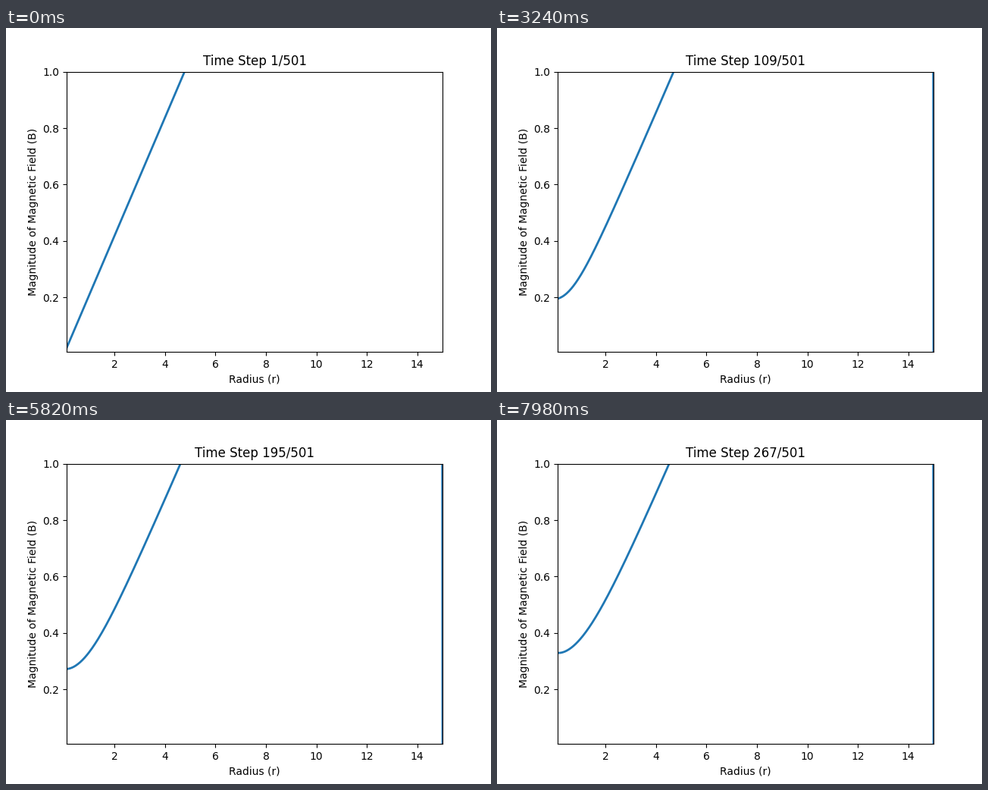
A matplotlib script that plays this animation: 640 px wide and 480 px high, repeating every 8 s.

```python
import numpy as np
import matplotlib.pyplot as plt
from matplotlib.animation import FuncAnimation

LOOP_MS = 8000
FRAMES = 267
TOTAL_STEPS = 501

R_MIN, R_MAX = 0.1, 15.0
SLOPE = np.pi / 15        # initial field is linear in r
DIFF = 0.0025             # diffusion per time step
LIFT = 3.05e-7            # slow overall growth
EDGE_WIDTH = 0.25         # reach of the inner boundary layer

r = np.linspace(R_MIN, R_MAX, 500)
theta = (np.arange(200) + 0.5) * np.pi / 200
cos_t = np.cos(theta)


def diffused_radius(spread):
    """Linear cone |r| smoothed by a 2D Gaussian, with spread = D * t."""
    x = r**2 / (4 * spread)
    weight = np.exp(np.outer(x / 2, cos_t - 1))
    i0 = weight.mean(axis=1)
    i1 = (weight * cos_t).mean(axis=1)
    return np.sqrt(np.pi * spread) * ((1 + x) * i0 + x * i1)


def field(n):
    if n == 0:
        return SLOPE * r
    edge = (-0.0063 + 4.1e-5 * n) * (1 - np.exp(-n / 10))
    b = SLOPE * diffused_radius(DIFF * n) + LIFT * n**2
    b += edge * np.exp(-(r - R_MIN) / EDGE_WIDTH)
    b[-1] = 0             # outer wall
    return b


fig, ax = plt.subplots(figsize=(6.4, 4.8), dpi=100)
line, = ax.plot(r, field(0), lw=2)
ax.set_xlim(R_MIN, R_MAX)
ax.set_ylim(R_MIN / R_MAX, 1)
ax.set_xlabel("Radius (r)")
ax.set_ylabel("Magnitude of Magnetic Field (B)")
title = ax.set_title(f"Time Step 1/{TOTAL_STEPS}")


def update(n):
    line.set_ydata(field(n))
    title.set_text(f"Time Step {n + 1}/{TOTAL_STEPS}")
    return line, title


anim = FuncAnimation(fig, update, frames=FRAMES, interval=LOOP_MS / FRAMES,
                     repeat=True, repeat_delay=0, blit=False)
plt.show()
```
